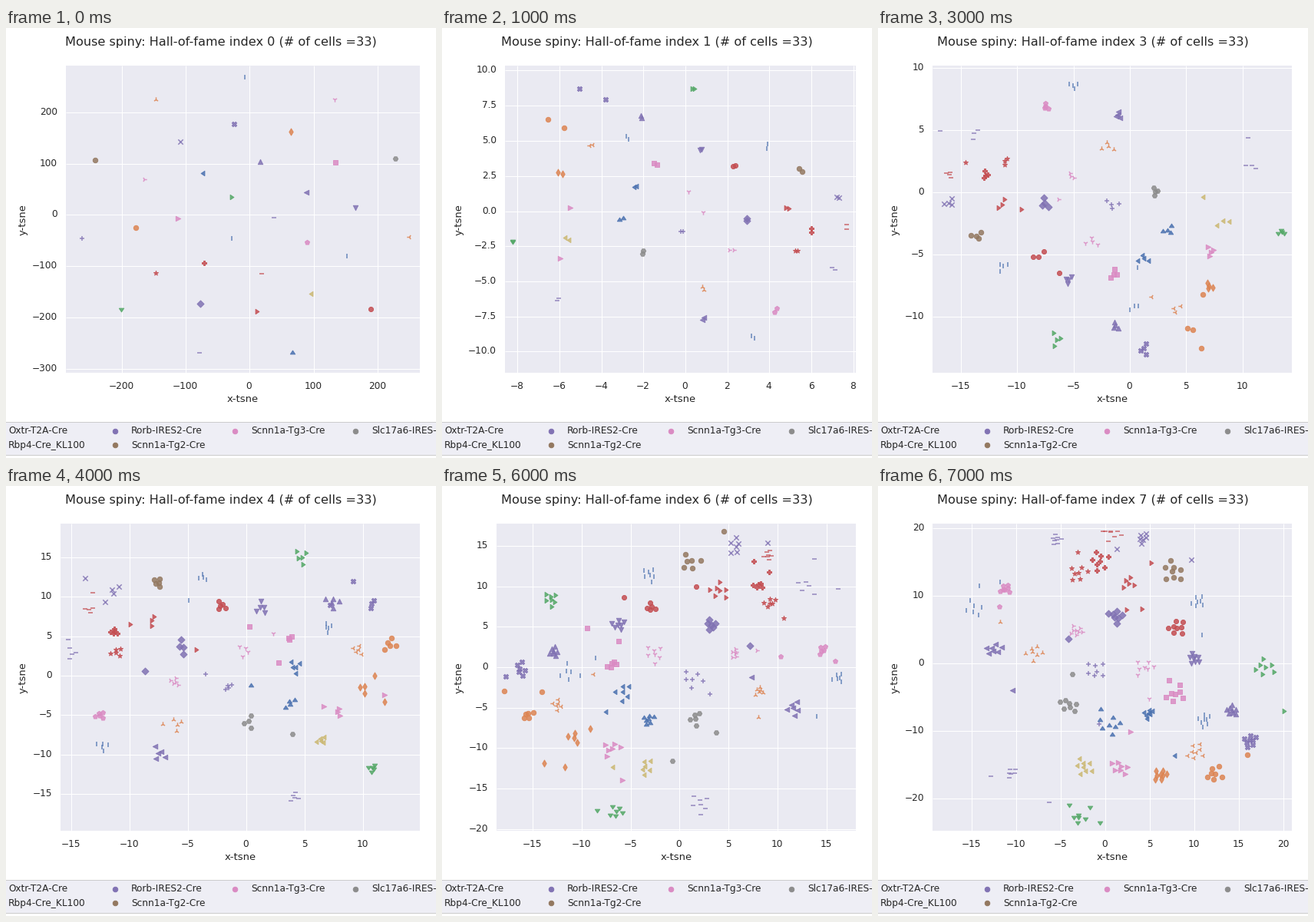
Recreate the animation shown at these times as a matplotlib script. Size 560 by 560 pixels, loop 8000 ms.

```python
import math
import random
import matplotlib.pyplot as plt
from matplotlib.animation import FuncAnimation
from matplotlib.patches import Rectangle

SIZE, DPI = 560, 80
PT = 72 / DPI  # points per pixel
TOP, BOTTOM, RIGHT = 49, 449, 539
CENTRE, RADII = (305, 248), (222, 188)
INK = "#262626"

BLUE, ORANGE, GREEN, RED = "#4c72b0", "#dd8452", "#55a868", "#c44e52"
PURPLE, BROWN, PINK, GRAY, YELLOW = "#8172b3", "#937860", "#da8bc3", "#8c8c8c", "#ccb974"

CARET_R = [(-.75, -1), (.75, 0), (-.75, 1), (-.75, -1)]
CARET_L = [(-x, y) for x, y in CARET_R]
CARET_U = [(y, x) for x, y in CARET_R]
CARET_D = [(y, -x) for x, y in CARET_R]
STROKES = list("|_x+1234")

# Marker, colour and home of each cell, in order from the inner ring outwards.
CELLS = [
    ("_", PURPLE, 337, 415), ("|", BLUE, 515, 251), (CARET_R, GREEN, 143, 148),

    ("p", PINK, 494, 215), ("_", RED, 434, 77), ("P", RED, 412, 128),
    (">", PINK, 222, 342), (CARET_L, BLUE, 235, 268), ("^", PURPLE, 145, 215),
    ("<", PURPLE, 457, 289),

    ("|", BLUE, 271, 116), (CARET_L, YELLOW, 264, 365), (CARET_R, RED, 362, 136),
    ("D", PURPLE, 351, 181), ("*", RED, 427, 153), ("o", ORANGE, 112, 296),
    ("4", PINK, 382, 218), ("x", PURPLE, 383, 79), ("X", PURPLE, 101, 238),
    ("d", ORANGE, 172, 328), ("s", PINK, 221, 231), ("v", PURPLE, 229, 181),

    ("3", ORANGE, 151, 283), ("8", RED, 273, 157), (CARET_U, BLUE, 269, 303),
    ("_", PURPLE, 489, 122), (CARET_D, GREEN, 226, 426), ("+", PURPLE, 326, 252),
    ("o", BROWN, 325, 97), ("2", ORANGE, 413, 268), ("|", BLUE, 168, 242),
    ("1", PINK, 277, 219), ("H", GRAY, 330, 303),
]

# cells in the ring, radius, angle of the first cell
RINGS = [(3, .17, 0), (7, .41, 25), (12, .67, 24), (11, 1, 8)]

# left edge, (zero pixel, pixels per unit) for x and y, turn of the homes, mirrored
VIEWS = [
    (78, (316.5, .832), (242.4, .669), 0, False),
    (82, (316, 27.35), (237.5, 18.3), 60, False),
    (82, (384.2, 27.35), (237.5, 18.3), 141, False),
    (71, (327, 14.65), (213, 16.22), -105, False),
    (71, (312, 15.2), (246, 10.28), 150, True),
    (71, (312, 15.2), (254, 10.28), 66, True),
    (71, (308.5, 12.74), (235, 10.53), 0, False),
    (71, (295, 11.58), (230, 8.775), 212, True),
]

LEGEND = [
    (3, 523.5, None, "Oxtr-T2A-Cre"), (163, 523.5, PURPLE, "Rorb-IRES2-Cre"),
    (319.5, 523.5, PINK, "Scnn1a-Tg3-Cre"), (476, 523.5, GRAY, "Slc17a6-IRES-Cre"),
    (3, 542, None, "Rbp4-Cre_KL100"), (163, 542, BROWN, "Scnn1a-Tg2-Cre"),
]

plt.rcParams["font.family"] = "DejaVu Sans"
fig = plt.figure(figsize=(SIZE / DPI, SIZE / DPI), dpi=DPI, facecolor="white")
ax = fig.add_axes([0, 0, 1, 1])


def text(x, y, s, px=12.1, **kw):
    kw = {"ha": "center", "va": "center", **kw}
    ax.text(x, y, s, fontsize=px * PT, color=INK, **kw)


def box(x0, y0, x1, y1, **kw):
    ax.add_patch(Rectangle((x0, y0), x1 - x0, y1 - y0, **kw))


def tick_step(scale):
    """Smallest round step that keeps ticks at least 45 pixels apart."""
    return next(m * 10 ** e for e in range(4) for m in (1, 2, 2.5, 5)
                if m * 10 ** e * scale >= 45)


def ticks(zero, scale, low, high, sign):
    """Yield pixel and label of each tick between two pixels."""
    step = tick_step(scale)
    for i in range(-8, 9):
        pos = zero + sign * i * step * scale
        if low <= pos <= high:
            label = f"{i * step:.1f}" if step % 1 else f"{i * step:.0f}"
            yield round(pos) + .5, label.replace("-", "\u2212")


def ring_spots():
    """Single cells spread evenly over concentric rings."""
    for count, radius, start in RINGS:
        for i in range(count):
            a = math.radians(start + 360 * i / count)
            yield 312 + 215 * radius * math.cos(a), 247 + 183 * radius * math.sin(a)


def turned(x, y, turn, mirrored):
    """Turn a home about the centre and keep it inside the ellipse."""
    u, v = (x - CENTRE[0]) / RADII[0], (y - CENTRE[1]) / RADII[1]
    a = math.atan2(-v if mirrored else v, u) + math.radians(turn)
    r = min(1, math.hypot(u, v))
    return CENTRE[0] + RADII[0] * r * math.cos(a), CENTRE[1] + RADII[1] * r * math.sin(a)


def cluster(x, y, n, left, rng):
    """Loose spiral of n points, a few of which stray."""
    step, phase = rng.uniform(2.5, 6), rng.uniform(0, 6.28)
    for i in range(n):
        r, a = step * math.sqrt(i), 2.4 * i + phase
        if i and rng.random() < .15:
            r = rng.uniform(18, 70)
        px, py = x + r * math.cos(a), y + r * math.sin(a)
        yield min(max(px, left + 10), RIGHT - 10), min(max(py, TOP + 10), BOTTOM - 10)


def draw_axes(left, xs, ys):
    box(left, TOP, RIGHT, BOTTOM, fc="#eaeaf2", lw=0)
    grid = dict(color="white", lw=PT, solid_capstyle="butt", zorder=1.5)
    for x, label in ticks(*xs, left, RIGHT, 1):
        ax.plot([x, x], [TOP, BOTTOM], **grid)
        text(x, 466, label)
    for y, label in ticks(*ys, TOP, BOTTOM, -1):
        ax.plot([left, RIGHT], [y, y], **grid)
        text(left - 11, y, label, ha="right")
    text((left + RIGHT) / 2, 483.5, "x-tsne", 13.1)
    text(22, 249.5, "y-tsne", 13.1, rotation=90)


def draw_cells(k, left, turn, mirrored):
    if k == 0:
        spots = list(ring_spots())
    else:
        spots = [turned(x, y, turn, mirrored) for *_, x, y in CELLS]
    for i, ((marker, color, *_), spot) in enumerate(zip(CELLS, spots)):
        x, y = zip(*cluster(*spot, k + 1, left, random.Random(100 * k + i)))
        width = 1.35 if marker in STROKES else .9
        ax.scatter(x, y, s=33, marker=marker, color=color, alpha=.85, lw=width, zorder=3)


def draw_legend():
    box(-9.5, 512.5, 570.5, 555.5, fc="#eeeef5", ec="#cccccc", lw=PT)
    for x, y, color, name in LEGEND:
        # one shared baseline per row
        text(x, y + 4.5, name, ha="left", va="baseline")
        if color:
            ax.scatter(x - 21.5, y + 1, s=34, color=color, lw=.9, zorder=3)


def draw(k):
    left, xs, ys, turn, mirrored = VIEWS[k]
    ax.clear()
    ax.set(xlim=(0, SIZE), ylim=(SIZE, 0))
    ax.axis("off")
    draw_axes(left, xs, ys)
    draw_cells(k, left, turn, mirrored)
    text(280, 22.5, f"Mouse spiny: Hall-of-fame index {k} (# of cells =33)", 16.1,
         va="baseline")
    draw_legend()
    return []


anim = FuncAnimation(fig, draw, frames=8, interval=1000, init_func=lambda: [],
                     repeat=True, repeat_delay=0)
plt.show()
```
